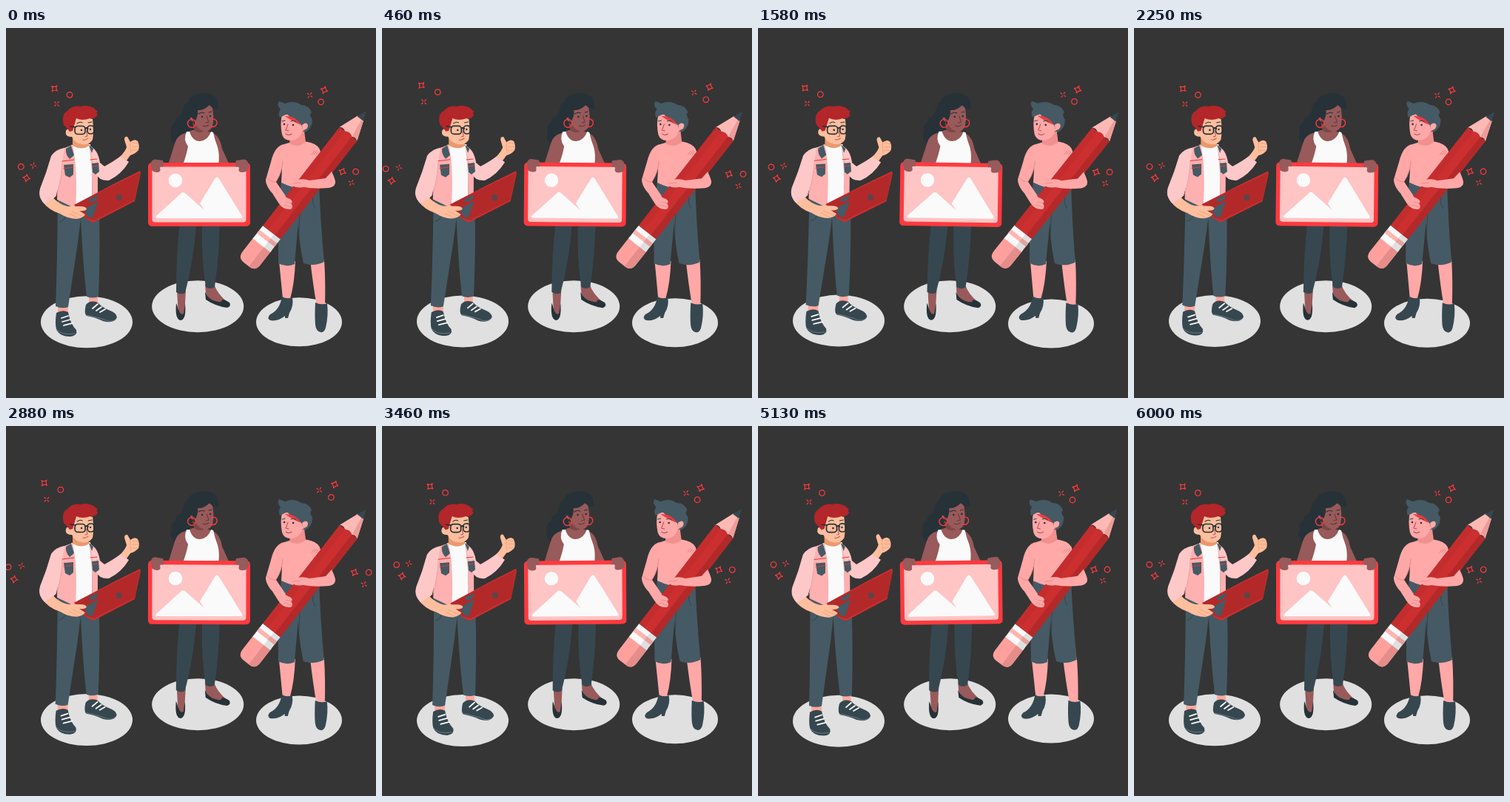
Animation, 500 px wide and 500 px high, one loop 6040 ms. Source, as an HTML page:

```html
<!DOCTYPE html>
<html lang="en">
<head>
<meta charset="utf-8">
<title>Creative team</title>
<style>
  html, body { margin: 0; width: 100%; height: 100%; overflow: hidden; background: #353535; }
  svg { display: block; width: 100vw; height: 100vh; }
  .line { fill: none; stroke-linecap: round; stroke-linejoin: round; }
</style>
</head>
<body>
<svg viewBox="0 0 500 500">
  <rect width="500" height="500" fill="#353535"/>
  <g fill="#e0e0e0">
    <ellipse id="manBase" cx="109" cy="397.3" rx="62" ry="35"/>
    <ellipse cx="259.2" cy="376.2" rx="62" ry="35"/>
    <ellipse id="girlBase" cx="396" cy="397.3" rx="58" ry="33"/>
  </g>

  <g id="man">
    <!-- legs and shoes -->
    <path fill="#ffa99f" d="M70 374H84V387H70ZM112 360H124V376H112Z"/>
    <g fill="#37474f">
      <path d="M68 385Q66 399 68 407Q72 417 87 417Q97 416 95 408Q87 400 84 384Q77 380 68 385Z"/>
      <path d="M108 374Q105 386 109 389Q121 391 131 396Q146 400 150 391Q149 385 141 382Q130 378 124 371Q114 367 108 374Z"/>
    </g>
    <path class="line" stroke="#fafafa" stroke-width="1.8" d="M75 392L84 389M76 397L87 394M78 402L90 399M117 379L124 373M122 382L129 377M127 384L134 380"/>
    <path class="line" stroke="#78909c" stroke-width=".7" d="M68 407Q75 416 93 413M109 388Q133 393 137 396Q146 397 149 393"/>
    <path fill="#455a64" d="M70 230L125 228Q128 285 125 363Q117 366 109 363Q104 320 101 258L97 290L84 377Q76 380 67 376Q69 330 70 230Z"/>
    <path class="line" stroke="#37474f" d="M72 262Q78 261 80 255"/>
    <!-- shirt and jacket -->
    <path fill="#fafafa" d="M88 158L114 157Q118 200 116 238L94 245Z"/>
    <path fill="#ffb0b0" d="M71 165L90 158Q97 190 94 244L69 232ZM112 158Q121 163 124 181V233L116 238Q118 195 112 158Z"/>
    <path fill="#ffc8c8" d="M79 162Q67 164 61 173Q55 195 46 217Q43 228 50 235L59 239L68 225Q75 200 76 181Z"/>
    <path fill="#ffc8c8" d="M112 159Q124 163 127 182L133 187Q146 180 155 173L166 181Q156 198 139 206Q126 207 122 197Z"/>
    <path class="line" stroke="#e9a0a0" stroke-width=".8" d="M76 182Q75 207 69 225M123 180L125 195"/>
    <path fill="#455a64" d="M81 163L88 159L92 172L86 177Q80 171 81 163ZM112 158L118 163L116 169ZM78 185L91 184V198L86 202L80 199ZM116 183L125 182L126 194L121 198L117 195Z"/>
    <path class="line" stroke="#e53935" d="M76 180L92 178M114 178L123 177M78 190L91 188M117 187L125 186"/>
    <!-- raised thumb -->
    <path fill="#ffbe9d" d="M154 174Q161 167 163 161L160 151Q160 146 164 147L168 154Q174 149 178 153Q181 159 179 165Q175 170 168 172L163 179Z"/>
    <path class="line" stroke="#eb996e" stroke-width=".7" d="M171 155L178 156M171 160L179 160M170 165L178 165M168 154Q167 161 169 168"/>
    <!-- laptop and forearm -->
    <path fill="#cc2f2f" d="M92 239L145 211L181 193L182 196L174 234L118 263L108 258Z"/>
    <path fill="#b32929" d="M93 239L142 214L181 195L174 232L119 260L109 257Z"/>
    <path fill="#455a64" d="M105 245L125 234L117 257L110 255ZM111 232L125 225L122 233L114 236Z"/>
    <circle cx="152.500" cy="229" r="4" fill="#59464b"/>
    <path fill="#ffbe9d" d="M49 234L62 228Q73 239 83 241L100 241Q109 241 109 245Q106 248 99 247L107 252Q105 256 96 258Q84 258 73 251Q57 246 49 234Z"/>
    <path class="line" stroke="#eb996e" stroke-width=".7" d="M89 248L103 254M86 251L98 257"/>
    <path fill="#ffc8c8" d="M46 219Q44 230 52 238L68 227L65 218Z"/>
    <!-- head -->
    <path fill="#eb996e" d="M90 148L111 151L112 159Q103 166 90 159Z"/>
    <path fill="#ffbe9d" d="M88 123Q104 118 117 123Q119 141 117 151Q112 159 102 157Q92 155 89 147Q79 147 81 139Q82 135 88 138Z"/>
    <path fill="#b3262a" d="M78 131Q74 117 83 112Q90 104 101 106Q110 103 120 109Q120 111 124 112Q121 115 124 117Q121 123 114 122Q103 126 95 122L90 139L86 140L83 136Z"/>
    <g class="line" stroke="#263238">
      <path stroke-width="1.700" d="M87 133L94 134M107 136Q109 134 111 136"/>
      <rect x="93" y="132.500" width="14" height="11" rx="4" stroke-width="1.700"/>
      <rect x="110" y="132" width="9" height="11" rx="4" stroke-width="1.700"/>
      <path d="M96 129Q100 126 103 128M111 128L116 127"/>
      <path stroke="#b7565b" d="M104 151Q108 152 111 149M108 139L110 146L107 147"/>
    </g>
    <g fill="#263238"><circle cx="102" cy="138" r="1.300"/><circle cx="114" cy="137" r="1.200"/></g>
  </g>

  <g id="woman">
    <path fill="#263238" d="M252 100Q241 99 240 108Q239 119 230 122Q230 128 225 131Q221 135 224 140Q220 146 224 151Q227 160 237 159Q249 162 252 149L259 120Z"/>
    <path fill="#985a5a" d="M231 354H243L241 391L233 390ZM269 346H281Q286 360 299 370L290 376Q275 369 270 359Z"/>
    <path fill="#263238" d="M230 372Q228 394 236 395Q244 394 242 372L240 386Q235 390 231 374ZM269 357L270 367Q283 376 299 378Q305 376 302 371Q296 367 292 367Q292 372 283 369Q274 367 269 357Z"/>
    <path fill="#37474f" d="M235 260H289Q288 310 282 350Q276 354 270 350Q264 315 265 268H257Q253 317 242 358Q236 361 230 357Q230 307 235 260Z"/>
    <path fill="#985a5a" d="M242 142L252 138H268L280 142Q290 148 292 163L302 185H287L270 160H252L239 185H219L228 156Q231 145 242 142Z"/>
    <path fill="#fafafa" d="M244 140H248Q252 153 262 153Q273 152 277 140L280 141Q282 151 286 161Q289 172 287 185H239Q244 171 246 160Q239 151 244 140Z"/>
    <path fill="#7f4646" d="M252 128L268 136L267 140Q260 143 254 138Q253 134 252 128Z"/>
    <path fill="#985a5a" d="M254 107L278 104Q282 119 279 133Q274 143 264 138Q258 136 255 127Q248 126 249 119Q251 115 256 120Z"/>
    <path fill="#263238" d="M248 121Q240 104 250 93Q262 86 275 89Q287 92 286 105Q286 107 288 108Q280 111 275 104Q267 112 259 111Q260 119 255 127Q252 126 252 121Z"/>
    <g class="line" stroke="#ff3a3f" stroke-width="1.400"><circle cx="251" cy="129" r="5.500"/><path d="M278 123Q286 123 285 129Q283 135 277 133"/></g>
    <g fill="#263238"><circle cx="265" cy="120" r="1.300"/><circle cx="276" cy="119" r="1.300"/></g>
    <path class="line" stroke="#263238" d="M260 116Q264 113 268 115M274 114L278 113"/>
    <path class="line" stroke="#6b3538" d="M271 119L274 127L270 128M266 132Q270 134 274 131"/>
    <g id="picture">
      <rect x="192" y="182" width="138" height="86" rx="5" fill="#ff3a3f"/>
      <rect x="197.500" y="187.500" width="127" height="75" rx="4" fill="#ffc4c4"/>
      <circle cx="229" cy="206" r="9.300" fill="#fafafa"/>
      <path fill="#fafafa" d="M204 257Q201 256 204 253L236 224Q239 220 243 224L268 246L262 237L282 204Q285 199 288 204L319 254Q320 257 317 257Z"/>
      <g fill="#985a5a">
        <path d="M196 182Q198 176 205 178L212 179Q214 185 212 188Q209 186 208 189Q210 195 204 195Q196 195 196 188Z"/>
        <path d="M327 182Q325 176 318 178L311 179Q309 185 311 188Q314 186 315 189Q313 195 319 195Q328 195 328 188Z"/>
      </g>
    </g>
  </g>

  <g id="girl">
    <path fill="#ffa8a7" d="M369 315H391Q390 345 384 366H374ZM411 313H430Q432 343 431 376H420Q415 348 411 313Z"/>
    <path fill="#37474f" d="M373 363Q380 367 387 364Q389 376 383 385L381 392H377V389Q367 397 357 395Q352 392 357 387Q370 381 373 363ZM418 371Q426 375 434 372Q436 388 432 405Q430 412 425 411Q419 410 418 401Q417 390 418 371Z"/>
    <path fill="#455a64" d="M372 206H423Q425 265 430 316Q416 323 402 318Q396 291 395 263L390 319Q379 324 368 318Q367 260 372 206Z"/>
    <path class="line" stroke="#37474f" d="M396 278L397 249M415 225Q413 238 418 243"/>
    <path fill="#ffa9a9" d="M376 157Q400 149 417 157Q426 162 425 171L424 216Q399 222 372 209L373 190L366 179Z"/>
    <path fill="#ffa8a7" d="M376 157Q363 159 358 181L351 205Q351 212 357 220L370 235L378 227L365 208Q374 192 374 181Z"/>
    <path class="line" stroke="#e88585" stroke-width=".9" d="M374 180Q373 195 366 206M353 203Q359 209 365 208"/>
    <path class="line" stroke="#dc7c7c" stroke-width=".8" d="M413 171L417 166M416 171L420 166M419 171L422 167"/>
    <!-- head -->
    <path fill="#f28f8f" d="M384 148L403 139L405 154Q394 163 383 156Z"/>
    <path fill="#ffa8a7" d="M373 117L399 116L402 128Q411 125 410 133Q408 140 401 139Q397 150 387 152Q376 153 373 144Q370 129 373 117Z"/>
    <path fill="#455a64" d="M370 121Q367 114 371 110Q365 103 369 99L377 102Q389 97 399 104Q409 104 413 114Q409 116 414 124Q414 136 404 141L401 137Q400 131 397 129Q384 122 380 116Z"/>
    <path fill="#ef3a40" d="M377 119Q391 118 399 131Q388 127 377 119Z"/>
    <path fill="#ffa8a7" d="M400 131Q406 126 408 131Q408 138 401 138Z"/>
    <g fill="#263238"><circle cx="376" cy="130" r="1.300"/><circle cx="388" cy="131" r="1.300"/></g>
    <path class="line" stroke="#37474f" d="M373 126L377 125M385 126Q389 124 392 127"/>
    <path class="line" stroke="#b84c57" d="M381 130L378 138L382 139M378 143Q382 146 386 143"/>
    <!-- pencil, pointing along local +x with its tip at the local origin -->
    <g transform="translate(486 113) rotate(-52.100)">
      <path fill="#ffa09d" d="M-226 -15H-251Q-262 -15 -262 -5V5Q-262 15 -251 15H-226Z"/>
      <path fill="#e58d8a" d="M-226 4H-262V5Q-262 15 -251 15H-226Z"/>
      <path fill="#c42d2d" d="M-207 -15H-38V15H-207Z"/>
      <path fill="#cc2f2f" d="M-207 -6H-36V6H-207Z"/>
      <path fill="#b32929" d="M-207 6H-38V15H-207Z"/>
      <path fill="#fafafa" d="M-229 -15H-207V15H-229Z"/>
      <path fill="#ffb4b1" d="M-220 -15H-214V15H-220Z"/>
      <path fill="#000" opacity=".1" d="M-229 4H-207V15H-229Z"/>
      <path fill="#ffb9b5" d="M-38 -15L-11 -5V5L-38 15Q-35 10 -38 6Q-34 0 -38 -6Q-35 -10 -38 -15Z"/>
      <path fill="#ed9c99" d="M-37 6L-11 2V5L-38 15Q-35 10 -37 6Z"/>
      <path fill="#37474f" d="M-12 -5L-1 -1Q1 0 -1 1L-12 5Z"/>
    </g>
    <!-- arms over the pencil -->
    <path fill="#ffa8a7" d="M440 194Q444 202 445 207Q446 214 437 216Q418 218 402 215Q390 217 386 211Q385 206 394 205Q403 203 410 206L432 203Z"/>
    <path fill="#ffa8a7" d="M361 225L370 219Q376 229 384 231Q389 235 385 237Q389 241 385 245Q374 246 368 236Z"/>
    <path class="line" stroke="#e88585" stroke-width=".8" d="M388 210L398 209M378 235L386 237M376 239L385 242"/>
  </g>

  <g id="sparkles" class="line" stroke="#ff3a3f" stroke-width="1.200"></g>
</svg>
<script>
const LOOP = 6040;
const $ = id => document.getElementById(id);
const center = { x: 245, y: 145 };

const glyphs = {
  star: "M0 -5Q1 -1 5 0Q1 1 0 5Q-1 1 -5 0Q-1 -1 0 -5Z",
  ring: "M-3.800 0A3.800 3.800 0 1 1 3.800 0A3.800 3.800 0 1 1 -3.800 0Z",
  cross: "M0 -4V-1.700M0 4V1.700M-4 0H-1.700M4 0H1.700"
};
const sparkles = [
  ["star", 66, 82, 40], ["ring", 86.5, 90.5, 0], ["cross", 69, 102.7, 45],
  ["ring", 21, 187.3, 0], ["cross", 37.5, 185.7, 15], ["star", 28.3, 202.5, 10],
  ["star", 429.5, 84, 20], ["ring", 425, 100, 0], ["cross", 410, 91, 35],
  ["star", 454, 194, 25], ["ring", 472, 194, 0], ["cross", 466, 209, 30]
].map(([kind, x, y, angle]) => {
  const el = document.createElementNS("http://www.w3.org/2000/svg", "path");
  el.setAttribute("d", glyphs[kind]);
  $("sparkles").append(el);
  return { el, x, y, angle };
});

// [time, spread] stops, eased with a half cosine between neighbours
const spreadStops = [[-90, 0], [680, 1], [1900, 0], [2250, 0], [3020, 1], [3550, 0], [5950, 0], [6720, 1]];

function spreadAt(t) {
  const i = spreadStops.findIndex(stop => stop[0] > t);
  const [t0, v0] = spreadStops[i - 1];
  const [t1, v1] = spreadStops[i];
  return v0 + (v1 - v0) * (1 - Math.cos(Math.PI * (t - t0) / (t1 - t0))) / 2;
}

function setTransform(el, value) {
  el.setAttribute("transform", value);
}

function draw(now) {
  const t = now % LOOP;
  const sway = Math.sin(2 * Math.PI * t / LOOP);

  // the man also stretches a little so his feet follow his platform
  setTransform($("man"), `translate(0 110) scale(1 ${1 - 0.006 * sway}) translate(0 -110) rotate(${0.75 * sway} 100 190)`);
  setTransform($("woman"), `rotate(${0.55 * sway} 262 200)`);
  setTransform($("picture"), `rotate(${0.3 * sway} 261 225)`);
  setTransform($("girl"), `rotate(${0.6 * sway} 390 210)`);
  $("manBase").setAttribute("cy", 397.3 - 1.8 * sway);
  $("girlBase").setAttribute("cy", 397.3 + 2.1 * sway);

  const scale = 1 + 0.087 * spreadAt(t);
  for (const { el, x, y, angle } of sparkles) {
    const px = center.x + (x - center.x) * scale;
    const py = center.y + (y - center.y) * scale;
    setTransform(el, `translate(${px} ${py}) rotate(${angle})`);
  }
}

function tick(now) {
  draw(now);
  requestAnimationFrame(tick);
}
draw(0);
requestAnimationFrame(tick);
</script>
</body>
</html>
```
